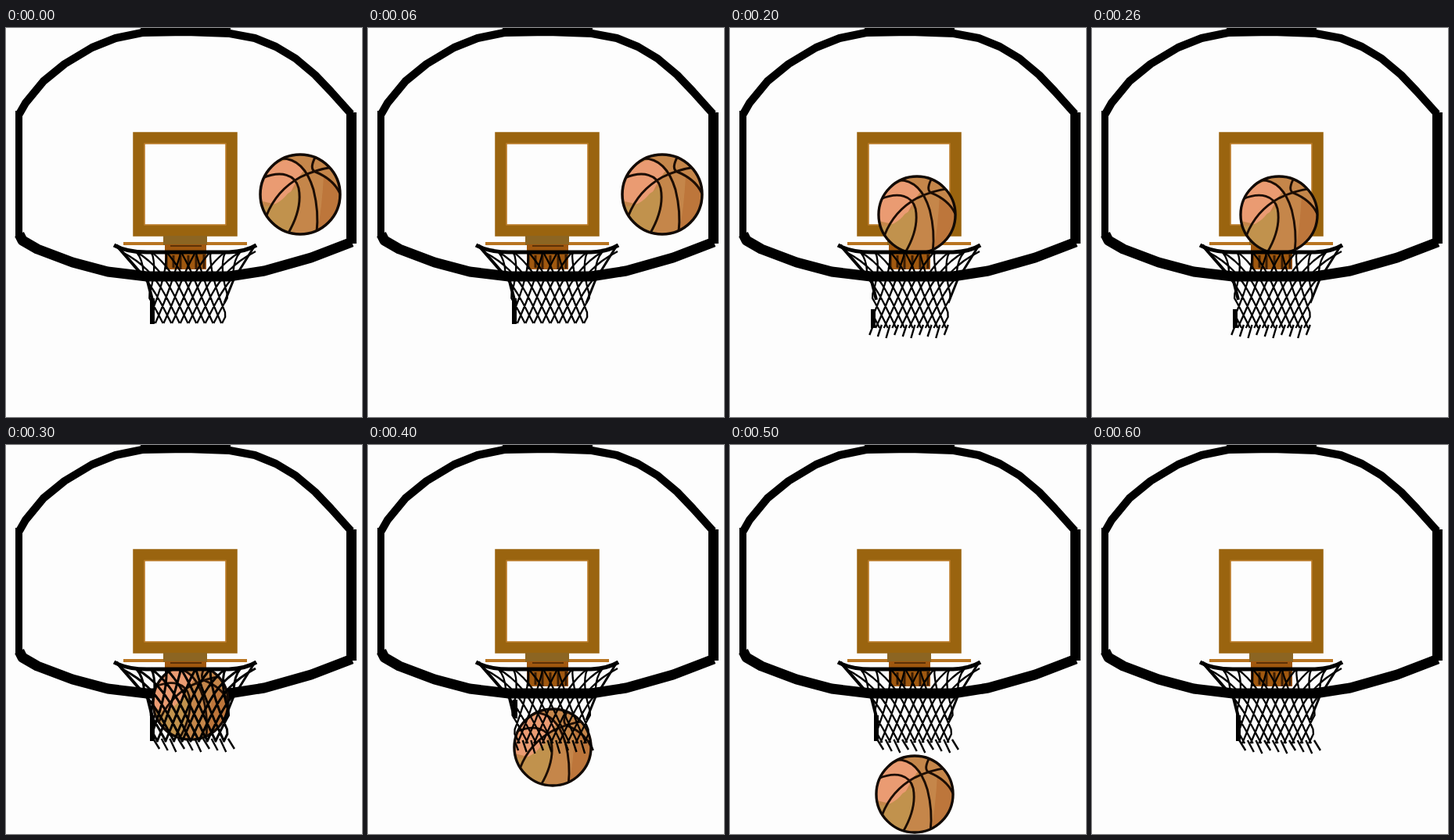
Animation, 455 px wide and 498 px high, one loop 700 ms. Source, as an HTML page:

```html
<!DOCTYPE html>
<html lang="en">
<head>
<meta charset="utf-8">
<title>Basketball shot</title>
<style>
html, body { margin: 0; width: 100%; height: 100%; overflow: hidden; background: #fdfdfd; }
svg { display: block; width: 100%; height: 100%; }
</style>
</head>
<body>
<svg viewBox="0 0 455 498" fill="none">
  <defs>
    <clipPath id="disc"><circle r="51"/></clipPath>
    <clipPath id="belowRim"><path d="M0 288H455V498H0Z"/></clipPath>
  </defs>

  <g id="board" stroke="#000" stroke-linejoin="round">
    <path d="M172 0H287V8H172Z" fill="#000" stroke="none"/>
    <path d="M17 110L25 96L48 68L75 46L110 25L140 13L174 6L230 5L286 7L318 13L345 24L370 39L395 60L415 81L441 110" stroke-width="10"/>
    <path d="M16.5 106V268" stroke-width="9"/>
    <path d="M441.5 108V276" stroke-width="13"/>
    <path d="M17 264L21 272L40 283L85 300L130 312L180 318H285L330 311L390 294L442 274" stroke-width="13"/>
  </g>

  <path d="M169.5 140.5H288.5V259.5H169.5Z" stroke="#9a640f" stroke-width="14.5"/>
  <path d="M177 148H281V252H177Z" stroke="#b8741c" stroke-width="1.5"/>

  <g id="bracket">
    <path d="M150 276H203M256 276H308" stroke="#b87420" stroke-width="4"/>
    <path d="M201 266H257V278H201Z" fill="#8c6522"/>
    <path d="M203 277H256V309H203Z" fill="#a0580f"/>
    <path d="M210 279H250" stroke="#5c3208" stroke-width="2"/>
    <path d="M205 290V309M214 291V307M223 291V309M233 291V307M243 291V309M253 290V308" stroke="#3a1d04" stroke-width="3"/>
  </g>

  <g id="ballLayer">
    <g id="ball">
      <circle r="51" fill="#c5864a"/>
      <g clip-path="url(#disc)">
        <path d="M-52 8C-50-30-28-47-8-44L4-30Q-4-20-12-3L-26 14Z" fill="#ea9b72"/>
        <path d="M-50 15Q-30 17-16-1L-2-10Q0 25-12 51H-30Z" fill="#c1924d"/>
        <path d="M30-24Q52-14 52 5Q48 36 22 50Q28 14 30-24Z" fill="#bd763b"/>
        <g stroke="#1c0d04" stroke-width="3">
          <path d="M-48-21C-24-31-6-25-2-8C2 12-6 34-16 51"/>
          <path d="M-43 27C-34 4-18-12 0-22C14-29 28-33 42-35"/>
          <path d="M-24-46C-1-46 11-26 17-6C22 14 23 32 21 49"/>
          <path d="M20-49C15-40 13-32 19-29C34-23 45-14 51-1"/>
        </g>
      </g>
      <circle r="51" stroke="#120a05" stroke-width="3.5"/>
    </g>
  </g>

  <g stroke="#000" stroke-linejoin="round">
    <path id="net"/>
    <path id="tufts" stroke-width="2.4"/>
    <path d="M141 278L181 324L187 348" stroke-width="4"/>
    <path d="M317 280L291 322L279 352" stroke-width="3"/>
    <path id="knot" stroke-width="6"/>
    <path d="M138 278Q154 287 180 287H285Q307 286 320 278" stroke-width="5"/>
  </g>
</svg>

<script>
const HOLD = 100;
const STRANDS = 10;
const RIM_Y = 286;
const LEFT_KNOT = "M187 346V379";
const poses = [
  { ball: [376, 213, 52], end: 378, lean: 0, knot: LEFT_KNOT },
  { ball: [291, 192, 52], end: 378, lean: 0, knot: "M277 339L268 367" },
  { ball: [239, 239, 50], end: 384, lean: -5, knot: "M183 360V384" },
  { ball: [236, 329, 49], end: 380, lean: 8, knot: LEFT_KNOT, inside: true },
  { ball: [236, 387, 50], end: 382, lean: 5, knot: "M188 326V350" },
  { ball: [236, 447, 50], end: 381, lean: 8, knot: LEFT_KNOT },
  { ball: null, end: 382, lean: 8, knot: LEFT_KNOT }
];
const get = id => document.getElementById(id);
const set = (id, name, value) => get(id).setAttribute(name, value);

// Folding strands back at the sides creates the crossing mesh.
function fold(u) {
  const v = ((u + 1) % 4 + 4) % 4;
  return v < 2 ? v - 1 : 3 - v;
}

function netX(u, y, lean) {
  const drop = y - RIM_Y;
  const half = 47 + 39 * Math.exp(-drop / 25);
  return 233 + lean * drop / 250 + half * fold(u);
}

function strand(u, slant, { end, lean }) {
  const points = [];
  for (let y = RIM_Y; y < end + 6; y += 6) {
    const row = Math.min(y, end);
    const twist = slant * ((row - RIM_Y) / 100) ** 1.2;
    points.push(netX(u + twist, row, lean).toFixed(1) + " " + row);
  }
  return "M" + points.join("L");
}

function drawNet(pose) {
  const { end, lean } = pose;
  let mesh = "", fringe = "";
  for (let i = 0; i < STRANDS; i++) {
    const u = -1 + 2 * i / (STRANDS - 1);
    mesh += strand(u, 0.85, pose) + strand(u, -0.85, pose);
    if (lean) fringe += `M${netX(u, end, lean)} ${end - 4}l${lean} ${13 + i % 3 * 2}`;
  }
  set("net", "d", mesh);
  set("tufts", "d", fringe);
}

function render(time) {
  const pose = poses[Math.floor(time / HOLD) % poses.length];
  set("ball", "visibility", pose.ball ? "visible" : "hidden");
  if (pose.ball) {
    const [x, y, r] = pose.ball;
    set("ball", "transform", `translate(${x} ${y}) scale(${r / 52})`);
  }
  set("ballLayer", "clip-path", pose.inside ? "url(#belowRim)" : "none");
  set("net", "stroke-width", pose.inside ? 3 : 2.3);
  set("knot", "d", pose.knot);
  drawNet(pose);
}

const start = performance.now();
function tick() {
  render(performance.now() - start);
  requestAnimationFrame(tick);
}
tick();
</script>
</body>
</html>
```
